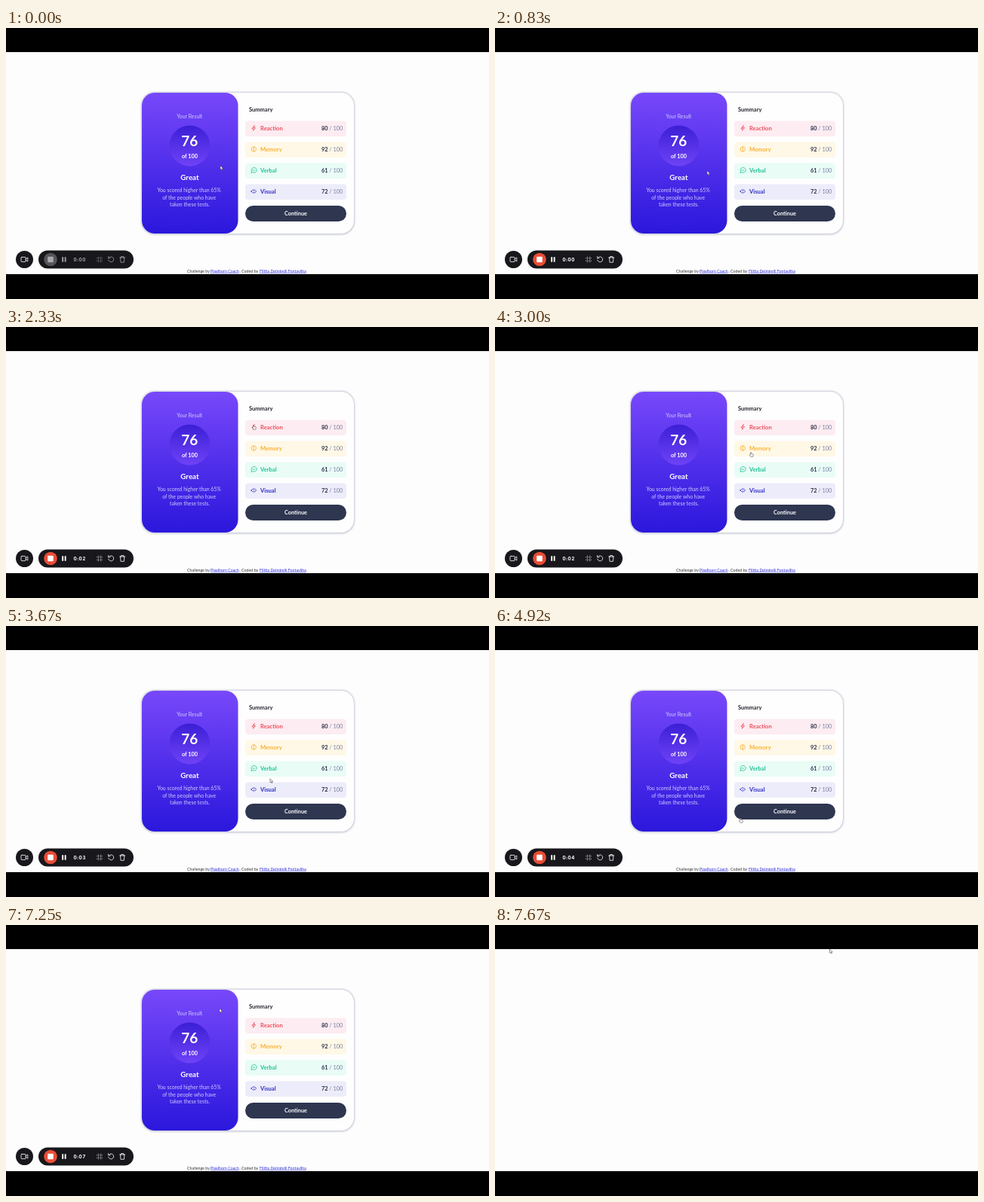
An HTML page for the animation above (8 s loop, 640 px wide and 360 px high).

```html
<!DOCTYPE html>
<html lang="en">
<head>
<meta charset="utf-8">
<title>Result summary</title>
<style>
  html, body { margin: 0; width: 100%; height: 100%; overflow: hidden; background: #000; }
  svg { display: block; width: 100vw; height: 100vh; font-family: Lato, "Open Sans", sans-serif; }
  .b { font-weight: 700; }
  .mid { text-anchor: middle; }
  .end { text-anchor: end; }
  .line { fill: none; stroke: currentColor; stroke-width: .8; stroke-linecap: round; stroke-linejoin: round; }
  .link { fill: #3434dc; text-decoration: underline; text-decoration-thickness: .4px; }
  .clock { font: 700 6.4px Inter, sans-serif; font-feature-settings: "tnum"; letter-spacing: .55px; }
  #bar { --ink: #a2a2a6; --disc: #55555a; --stop: #aaaaae; }
  #bar.on { --ink: #fff; --disc: #ea4c36; --stop: #fff; }
  #tools { color: var(--ink); }
</style>
</head>
<body>
<svg viewBox="0 0 640 360">
  <defs>
    <linearGradient id="panel" x2="0" y2="1">
      <stop stop-color="#7848fa"/><stop offset="1" stop-color="#2b17dc"/>
    </linearGradient>
    <linearGradient id="disc" x2="0" y2="1">
      <stop stop-color="#3b1fd6"/><stop offset="1" stop-color="#6f42f6"/>
    </linearGradient>
    <filter id="soft" x="-10%" y="-10%" width="120%" height="120%"><feGaussianBlur stdDeviation="1"/></filter>
  </defs>

  <rect width="640" height="360"/>
  <rect y="32" width="640" height="295" fill="#fdfdfd"/>

  <g id="page">
    <rect x="179" y="85" width="283" height="189.5" rx="18" fill="#c3c5d4" filter="url(#soft)"/>
    <rect x="180" y="86" width="281" height="187" rx="17" fill="#fefefe"/>
    <rect x="180" y="86" width="127.5" height="187" rx="17" fill="url(#panel)"/>
    <circle cx="243.5" cy="156.5" r="27" fill="url(#disc)"/>
    <g class="mid" fill="#fff">
      <g fill="#cfcaff" font-size="6.9">
        <text x="243.3" y="120.2">Your Result</text>
        <text y="218">
          <tspan x="243.5">You scored higher than 65%</tspan>
          <tspan x="243.5" dy="9.5">of the people who have</tspan>
          <tspan x="243.5" dy="9.5">taken these tests.</tspan>
        </text>
      </g>
      <text class="b" x="243.3" y="157" font-size="19">76</text>
      <text class="b" x="243.5" y="172.6" font-size="7.3">of 100</text>
      <text class="b" x="243.5" y="201.6" font-size="9.8">Great</text>
    </g>
    <text class="b" x="322" y="110.6" font-size="7.5" fill="#23252e">Summary</text>
    <g id="rows"></g>
    <rect x="317" y="236" width="134" height="21" rx="10.5" fill="#2e3650"/>
    <text class="b mid" x="384" y="249" font-size="7.3" fill="#fff">Continue</text>

    <g font-size="5.3" fill="#333">
      <text x="240" y="324.6">Challenge by</text>
      <text class="link" x="271" y="324.6">Pixelhorn Coach</text>
      <text x="309.5" y="324.6">. Coded by</text>
      <text class="link" x="336" y="324.6">Filitta Delmirelli Fontavilha</text>
    </g>

    <g id="bar">
      <circle cx="24.5" cy="307.5" r="11.5" fill="#18181c"/>
      <g class="line" color="#fff">
        <rect x="20" y="304.4" width="6.2" height="6.2" rx="1"/>
        <path d="M26.2 306.6l2.6-1.6v5l-2.6-1.6"/>
      </g>
      <rect x="43" y="295.5" width="126" height="24" rx="12" fill="#18181c"/>
      <circle cx="59" cy="307.5" r="8.8" fill="var(--disc)"/>
      <rect x="55.2" y="303.7" width="7.6" height="7.6" rx="1" fill="var(--stop)"/>
      <g id="tools">
        <path d="M74.2 304.2h1.9v6.6h-1.9zM77.7 304.2h1.9v6.6h-1.9z" fill="currentColor"/>
        <text id="clock" class="clock" x="89.6" y="309.9" fill="currentColor">0:00</text>
        <path class="line" stroke-dasharray="0 1.75" d="M120.5 305.7h7.2M120.5 309.3h7.2M122.3 304v7.2M125.8 304v7.2"/>
        <path class="line" d="M136.2 305.5a3.5 3.5 0 1 1-.5 2.6M135.6 303.5v2.3h2.4"/>
        <path class="line" d="M150.7 305h7M152.7 305v-1.5h3v1.5M151.5 305l.5 6.3h4.4l.5-6.3"/>
      </g>
    </g>
  </g>

  <g id="cursor" fill="#fff" stroke="#444" stroke-width=".55" stroke-linejoin="round">
    <path id="arrow" d="M0 0V5.1L1.2 4 2.1 6 3 5.6 2.1 3.7H3.7Z"/>
    <path id="hand" d="M-.6 3.3V.4q.6-.9 1.2 0V2l2.2.5q.6.2.5.9l-.5 2.4H-.2L-1.6 3.8q-.2-.8 1-.5Z"/>
  </g>
</svg>
<script>
const $ = id => document.getElementById(id);
const LOOP = 8000, BLANK = 7580, START = 250, STEP = 1000 / 12;
const ROW = { top: 123.5, height: 20.5, gap: 28 };

// name, score, ink, fill, icon centred on its row
const rows = [
  ["Reaction", 80, "#ee4f5e", "#fdecf1", "M.8-3.4l-3.2 4h2.2L-.8 3.4l3.2-4H.2z"],
  ["Memory", 92, "#f9b02e", "#fff8e6", "M0-3.2v6.4M-3.2 0a3.2 3.2 0 1 0 6.4 0 3.2 3.2 0 1 0-6.4 0"],
  ["Verbal", 61, "#1fc095", "#e9fcf6", "M-3.2 3.3l.3-2a3.6 3.4 0 1 1 1.4 1.5zM-1.5 0h3"],
  ["Visual", 72, "#2a2cc4", "#edecfa", "M-3.4 0Q0-4.4 3.4 0 0 4.4-3.4 0zM0 0h.1"]
];
$("rows").innerHTML = rows.map(([name, score, ink, fill, icon], i) => `
  <g transform="translate(0 ${ROW.gap * i})" font-size="7.4">
    <rect x="317" y="${ROW.top}" width="134" height="${ROW.height}" rx="4" fill="${fill}"/>
    <path class="line" color="${ink}" transform="translate(328.3 133)" d="${icon}"/>
    <text class="b" x="337" y="135.7" font-size="7.6" fill="${ink}">${name}</text>
    <text class="b" x="418" y="136.4" fill="#2b3048">${score}</text>
    <text class="end" x="446.3" y="136.4" fill="#7b80a4">/ 100</text>
  </g>`).join("");

// turning points of the pointer tip: time, x, y
const turns = [
  [0, 284, 183], [830, 280, 191], [1250, 420, 36], [1550, 476, 120],
  [2330, 328, 130], [3670, 350, 203], [4170, 257, 113], [4250, 440, 200],
  [4580, 440, 200], [4920, 324, 256], [5330, 364, 208], [5420, 257, 161],
  [6000, 303, 88], [6420, 443, 32], [6920, 210, 247], [7080, 283, 111]
];
const exit = [443.5, 32];

function pointAt(t) {
  const i = turns.findIndex(p => p[0] > t);
  if (i < 0) return turns[turns.length - 1].slice(1);
  const [t0, ...from] = turns[i - 1], [t1, ...to] = turns[i];
  return from.map((v, k) => v + (to[k] - v) * (t - t0) / (t1 - t0));
}

function clickable([x, y]) {
  const down = y - ROW.top;
  const onRow = down > 0 && down < ROW.gap * rows.length && down % ROW.gap < ROW.height;
  return x > 317 && x < 451 && (onRow || (y > 236 && y < 257));
}

function draw(time) {
  const blank = time >= BLANK;
  const tip = blank ? exit : pointAt(Math.floor((time + 4) / STEP) * STEP);
  const hand = !blank && clickable(tip);
  $("page").style.display = blank ? "none" : "";
  $("bar").classList.toggle("on", time >= START);
  $("clock").textContent = "0:0" + Math.max(0, Math.floor((time - START) / 1000));
  $("cursor").setAttribute("transform", `translate(${tip})`);
  $("arrow").style.display = hand ? "none" : "";
  $("hand").style.display = hand ? "" : "none";
}

const begin = performance.now();
function tick() {
  draw((performance.now() - begin) % LOOP);
  requestAnimationFrame(tick);
}
tick();
</script>
</body>
</html>
```
